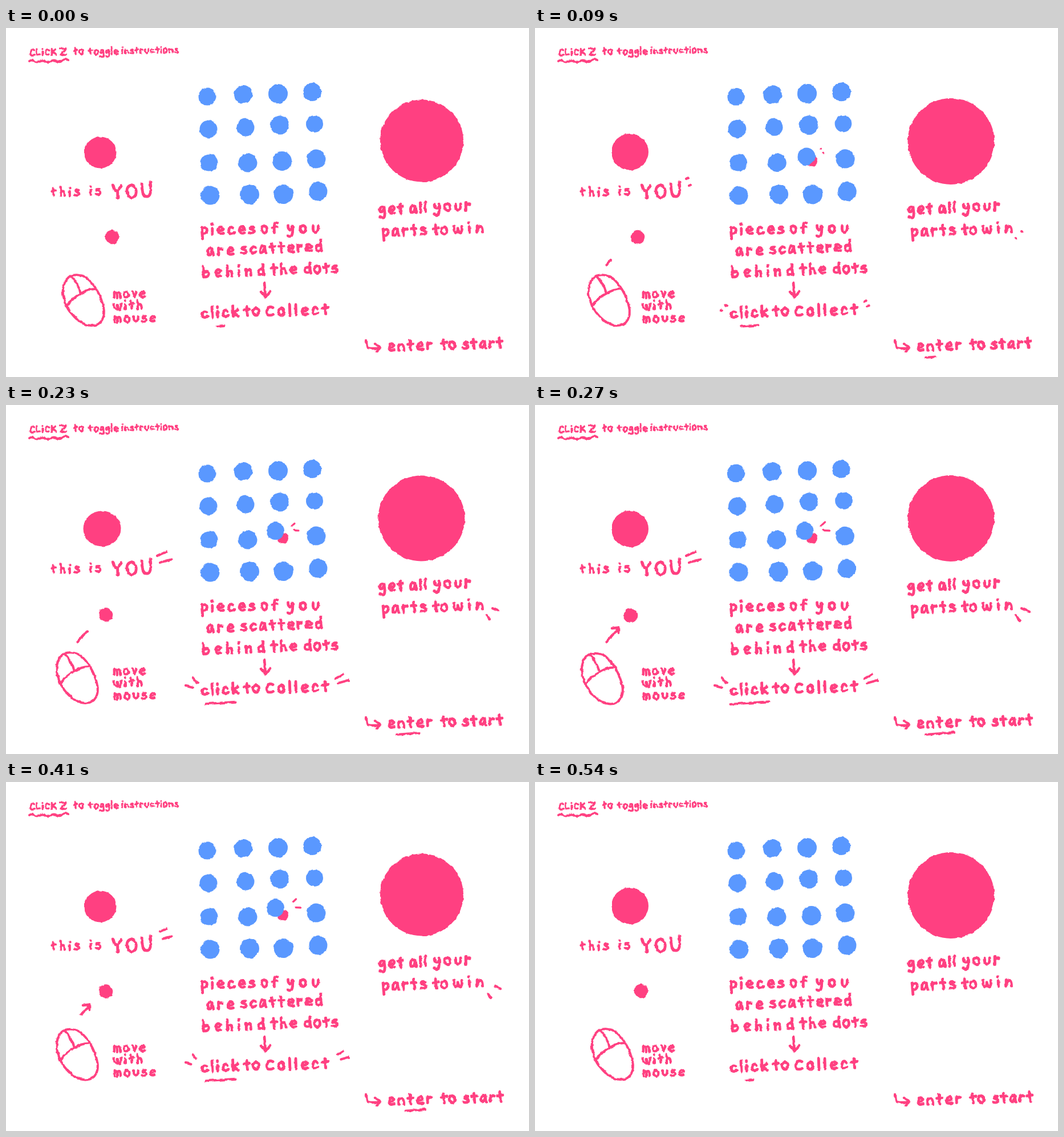
An HTML page that plays this animation: 917 by 611 pixels, repeating every 0.63 s.

```html
<!DOCTYPE html>
<html lang="en">
<head>
<meta charset="utf-8">
<title>How to play</title>
<style>
  html, body { margin: 0; width: 100%; height: 100%; overflow: hidden; background: #fff; }
  svg { display: block; width: 100%; height: 100%; }
  .ink { fill: none; stroke: #ff4081; stroke-width: 4.3; stroke-linecap: round; stroke-linejoin: round; }
  .word { stroke-width: 4.9; }
  .pink { fill: #ff4081; }
  .blue { fill: #5a98ff; }
</style>
</head>
<body>
<svg viewBox="0 0 917 611">
  <defs>
    <filter id="rough" filterUnits="userSpaceOnUse" x="0" y="0" width="917" height="611" color-interpolation-filters="sRGB">
      <feTurbulence type="fractalNoise" baseFrequency=".11" numOctaves="2" seed="4"/>
      <feDisplacementMap in="SourceGraphic" scale="4" xChannelSelector="R" yChannelSelector="G"/>
    </filter>
  </defs>
  <g id="stage" filter="url(#rough)"></g>
</svg>
<script>
const STEP = 90, STEPS = 7;
const stage = document.getElementById('stage');

function add(tag, attrs, parent = stage) {
  const node = document.createElementNS('http://www.w3.org/2000/svg', tag);
  set(node, attrs);
  parent.append(node);
  return node;
}
function set(node, attrs) {
  for (const key in attrs) node.setAttribute(key, attrs[key]);
}
const ink = (d, width = 4.3) => add('path', { class: 'ink', d, style: `stroke-width:${width}` });
const blob = cls => add('ellipse', { class: cls });
const place = (node, cx, cy, rx, ry = rx) => set(node, { cx, cy, rx, ry });
const show = (node, on) => set(node, { visibility: on ? 'visible' : 'hidden' });

// Pen strokes of each letter: advance width, then path from the baseline
const GLYPHS = {
  a: [11, 'M9-11Q2-14 1-6Q1 1 5-1Q9-4 9-11Q9-4 11 0'],
  b: [10, 'M1-19Q0-9 1 0M1-8Q10-13 10-5Q8 2 1-1'],
  c: [10, 'M9-10Q3-14 1-6Q1 2 10-2'],
  d: [11, 'M10-19Q9-8 11 0M10-9Q2-13 1-5Q2 2 10-2'],
  e: [10, 'M1-6Q10-5 10-9Q6-15 2-9Q-1 2 10-1'],
  f: [10, 'M10-17Q3-22 4 0M0-9L9-10'],
  g: [10, 'M9-11Q2-14 1-6Q3 0 9-9Q11 6 7 7Q3 7 1 5'],
  h: [9, 'M1-18L1 0M1-7Q9-14 9 0'],
  i: [2, 'M1-10L1 0M1-17L1-16.5'],
  k: [10, 'M1-18L1 0M9-11L2-6L10 0'],
  l: [2, 'M1-18L1 0'],
  m: [13, 'M1-12L1 0M1-8Q7-15 7 0M7-8Q13-15 13 0'],
  n: [10, 'M1-11L1 0M1-7Q10-15 10 0'],
  o: [11, 'M6-12Q0-11 1-5Q3 1 7 0Q12-3 10-9Q9-12 5-12'],
  p: [10, 'M1-12L2 8M1-9Q10-15 10-6Q8 1 2-1'],
  r: [8, 'M1-12L1 0M1-7Q4-12 8-10'],
  s: [9, 'M8-11Q1-12 2-8Q10-6 9-2Q6 1 0-1'],
  t: [9, 'M4-16L5 0M0-10L9-11'],
  u: [10, 'M1-11Q0 0 6 0Q10-1 10-11'],
  v: [9, 'M1-11L5 0L9-11'],
  w: [15, 'M1-11Q1 0 5 0Q8-1 8-9Q9 1 13 0Q16-3 15-11'],
  y: [10, 'M1-12Q1-5 5-5Q9-6 9-12Q10 1 7 6Q4 8 1 6'],
  C: [12, 'M12-14Q4-19 1-8Q1 2 12-2'],
  K: [11, 'M1-17L1 0M10-16L2-9L11 0'],
  L: [10, 'M1-17L1 0L10-1'],
  O: [17, 'M9-22Q0-21 0-11Q1 0 8 0Q17-1 16-12Q15-22 8-22'],
  U: [16, 'M0-24Q-1 0 9-1Q17-2 15-25'],
  Y: [15, 'M0-23Q2-13 8-12L15-22M8-12L8 0'],
  Z: [17, 'M1-16L16-17L2 0L17-1']
};

function write(text, x, y, gap, size = 1, tilt = -2) {
  const group = add('g', { role: 'img', 'aria-label': text });
  const line = add('g', { transform: `translate(${x} ${y}) rotate(${tilt}) scale(${size})` }, group);
  let pen = 0;
  for (const letter of text) {
    const [width, d] = GLYPHS[letter];
    add('path', { class: 'ink word', d, transform: `translate(${pen})` }, line);
    pen += width + gap / size;
  }
  return group;
}

write('CLiCK', 42, 48, 3.6, .65, -1);
write('Z', 94.5, 47, 0, .65);
write('to', 119, 46, 4, .65);
write('toggle', 145, 46.5, 3.4, .65, -1);
write('instructions', 204, 44.5, 3.4, .6, -1);
write('this', 79.5, 294, 8.1, .85, -1);
write('is', 148, 292, 7.7, .85);
write('YOU', 188, 298, 9.5);
write('pieces', 342.5, 361, 8.4, 1, -1);
write('of', 447.5, 359, 8);
write('you', 493.5, 358, 11.5, 1, 0);
write('are', 352.5, 398, 8.5);
write('scattered', 412.5, 395, 6.75);
write('behind', 345.5, 436, 11);
write('the', 465.5, 431, 7.5);
write('dots', 523.5, 429.5, 5.7);
write('click', 343.5, 507.5, 7.5, 1, -3);
write('to', 418.5, 503.5, 5);
write('Collect', 456.5, 504, 8.7);
write('get', 654.5, 325.5, 6.5);
write('all', 708.5, 323.5, 6.5);
write('your', 750.5, 320.5, 8);
write('parts', 660.5, 364, 7.2);
write('to', 749.5, 361, 4);
write('win', 784.5, 359, 12);
write('move', 189, 472, 5.8, .85, -1);
write('with', 189, 493, 6.4, .85);
write('mouse', 190, 515, 6.5, .85, -1);
write('enter', 670.5, 565, 7.2);
write('to', 763.5, 562, 4);
const start = write('start', 801, 561.5, 5.8);

ink('M42 58Q46 55 50 58T59 58T69 58T79 58T89 58T99 57T109 56', 3.8);
ink('M453 446L455 470M447 462L455 471L463 461', 4.6);
ink('M632 546Q632 557 634 560Q645 562 655 560M647 553L656 560L650 566');

const mouse = ink('M113 434C103 440 97 456 101 471C107 497 128 520 150 521' +
  'C169 521 174 504 171 489C166 466 154 448 142 438C134 432 122 431 113 434' +
  'Q126 446 131 465M106 487Q117 472 131 465Q144 457 156 457', 4);
const cursor = blob('pink'), you = blob('pink'), whole = blob('pink'), piece = blob('pink');

// Grid of dots: x, y and radius by row
const GRID = [
  [353, 120, 15.5, 416, 116, 16, 477, 115, 17, 537, 112, 16],
  [355, 177, 15.5, 420, 174, 15.5, 480, 170, 16.5, 541, 168, 15],
  [356, 236, 15.5, 424, 236, 16.5, 484, 233, 17, 544, 229, 16.5],
  [358, 293, 16.5, 427, 291.5, 17, 486.5, 291, 17, 547, 286, 16.5]
];
const dots = GRID.flatMap(row => [0, 3, 6, 9].map(i => ({ spot: row.slice(i, i + 3), node: blob('blue') })));
const HIDER = 10;

// Each stroke shows only the part of its length between two fractions
const QUICK = [null, [0, .2], [0, 1], [0, 1], [.3, 1], [.65, 1], null];
const SLOW = [null, [0, .06], [0, .65], [0, 1], [.3, 1], [.7, 1], null];
const DRAWN = [null, [0, .35], [0, .77], [0, 1], [.31, 1], [.66, 1], null];
const strokes = [];
function stroke(x1, y1, x2, y2, windows, width = 4.2) {
  strokes.push({ ends: [x1, y1, x2, y2], windows, node: ink('', width) });
}
stroke(265, 264, 281.5, 256.5, QUICK);
stroke(269, 276, 289.5, 270.5, QUICK);
stroke(578, 479, 591, 471, QUICK);
stroke(582, 487, 600, 482, QUICK);
stroke(336, 487, 328, 478, QUICK);
stroke(328, 494, 316, 491, QUICK);
stroke(843, 368, 851, 379, SLOW);
stroke(853, 356, 867, 362, SLOW);
stroke(501, 212, 508.5, 205, SLOW, 3.4);
stroke(505, 219.5, 515.5, 220, SLOW, 3.4);
stroke(125, 415, 147, 390, DRAWN, 4.6);
stroke(685, 577, 735, 573, DRAWN, 4);
const arrowHead = ink('M135 391L147 389.5L147 399', 4.6);
const underline = ink('', 4);

const HAND = [[0, 0], [-6, 0], [-11, 1], [-18, 2.5], [-11, .5], [-5, .5], [0, 0]];
const SLIDE = [[484, 233, 17], [476, 225, 15.5], [472.5, 220.5, 15.5], [473, 220.5, 15.5],
  [472.5, 220.5, 15.5], [477.5, 224.5, 16], [484.5, 234, 17]];
const YOU_POSES = [[165.5, 218, 28, 27.5], [166.5, 217, 32.5, 32], [168.5, 216.5, 33, 31]];
const WHOLE_POSES = [[729, 197.5, 73, 72], [729.5, 198.5, 76, 75.5], [728.5, 198.5, 76, 75]];
const POSES = [0, 1, 2, 1, 0, 2, 1];
const SPREAD = [6, 15, 26, 34, 26, 17, 6];
const NUDGE = [0, -1, 0, 1, 1, 2, 2];

// Repeatable jitter between -1 and 1
const jitter = seed => Math.sin(seed * 127.1 + Math.sin(seed * 3.7) * 43);

function draw(step) {
  const [dx, dy] = HAND[step];
  set(mouse, { transform: `translate(${dx} ${dy})` });
  place(cursor, 186 + dx, 366 + dy, 12.3);
  place(you, ...YOU_POSES[POSES[step]]);
  place(whole, ...WHOLE_POSES[POSES[step]]);
  place(piece, 485, 233, 10);
  show(piece, step > 0 && step < 6);

  dots.forEach(({ spot: [x, y, r], node }, i) => {
    const sway = step % 2, seed = i * 7 + step;
    if (i === HIDER) place(node, ...SLIDE[step]);
    else place(node, x + sway * .6 * jitter(seed), y + sway * .5 * jitter(seed + 200), r + sway * .4 * jitter(seed + 400));
  });

  for (const { ends: [x1, y1, x2, y2], windows, node } of strokes) {
    const span = windows[step];
    show(node, span);
    if (!span) continue;
    const [from, to] = span.map(k => `${x1 + (x2 - x1) * k} ${y1 + (y2 - y1) * k}`);
    set(node, { d: `M${from}L${to}` });
  }
  show(arrowHead, step > 2 && step < 6);

  const half = SPREAD[step];
  set(underline, { d: `M${376.5 - half} ${521.5 + half * .07}L${376.5 + half} ${521 - half * .05}` });
  set(start, { transform: `translate(${NUDGE[step]})` });
}

let shown = -1;
function tick(now) {
  const step = Math.floor(now / STEP) % STEPS;
  if (step !== shown) draw(shown = step);
  requestAnimationFrame(tick);
}
draw(shown = 0);
requestAnimationFrame(tick);
</script>
</body>
</html>
```
